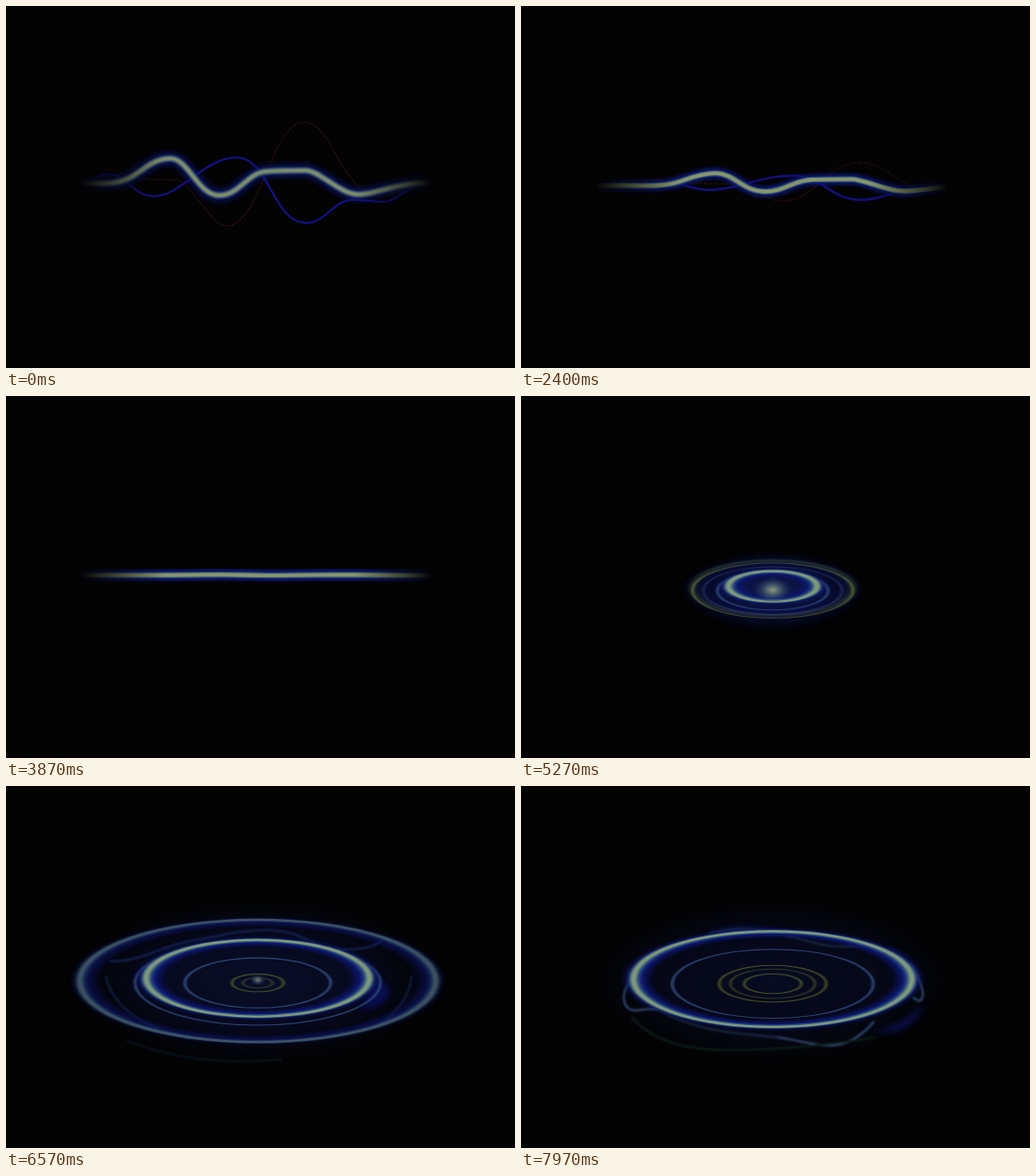
These frames come from a looping animation (552x392 px, 8 s). An HTML page without scripts:

```html
<!DOCTYPE html>
<html lang="en">
<head>
<meta charset="utf-8">
<title>Wave to ripples</title>
<style>
html, body { margin: 0; height: 100%; overflow: hidden; background: #030304; }
svg { display: block; width: 552px; height: 392px; }
path { fill: none; vector-effect: non-scaling-stroke; }
circle { fill: none; }
svg * { animation-duration: 8s; animation-iteration-count: infinite; animation-timing-function: linear; }

/* Wave */
.line { transform-origin: 273px 193px; animation-name: gather; }
.wave, .echo { transform-origin: 0 192px; }
.wave { animation-name: settle; }
.echo { animation-name: settle-echo; }
.halo { stroke: #0d1670; stroke-width: 13; filter: blur(3px); opacity: .8; }
.edge { stroke: #30568a; stroke-width: 6.5; filter: blur(1.2px); opacity: .85; }
.core { stroke: #88966a; stroke-width: 4.2; filter: blur(.8px); }

@keyframes settle {
  0% { transform: none; }
  30% { transform: translate(33px, 2.5px) scaleY(.5); }
  48% { transform: translate(54px, 2px) scaleY(.02); }
  100% { transform: translate(54px, 2px) scaleY(.02); }
}
@keyframes settle-echo {
  0% { transform: none; }
  30% { transform: translate(44px, 2px) scaleY(.37); }
  48% { transform: translate(66px, 2px) scaleY(.02); }
  100% { transform: translate(66px, 2px) scaleY(.02); }
}
@keyframes gather {
  0%, 50% { transform: none; opacity: 1; animation-timing-function: ease-in-out; }
  58% { transform: translateY(16px) scaleX(.06); opacity: 1; }
  61%, 100% { transform: translateY(18px) scaleX(.02); opacity: 0; }
}

/* Ripples: radius = base + shared travel + offset, tilted so the sides look thicker */
@property --t { syntax: "<number>"; inherits: true; initial-value: -100; }
.rings { animation-name: travel; }
.rings circle {
  --r: calc(var(--b) + var(--t) + var(--o, 0));
  r: calc(max(0, var(--r)) * 1px);
  transform: translate(273px, calc((var(--y, 212) + .03 * var(--t)) * 1px)) scale(1, .343);
  opacity: clamp(0, min(var(--r) / 14, (210 - var(--r)) / 45), 1);
}
.rings .halo { stroke-width: 22; filter: blur(5px); }
.rings .edge { stroke: #2a5080; stroke-width: 12; filter: blur(2px); }
.rings .core { stroke: #829a7c; stroke-width: 6.5; filter: blur(1.4px); }
.thin { stroke-width: 3; filter: blur(.8px); }
.blue { stroke: #2f4a7c; }
.olive { stroke: #444e26; }
.violet { stroke: #262850; }
.fast { animation-name: travel-fast, show-fast; }
.first { animation-name: travel-first, show-first; }
.mid { animation-name: show-mid; }

@keyframes travel {
  0%, 56% { --t: -100; }
  65.875% { --t: -32; }
  74.125% { --t: 0; }
  82.125% { --t: 41; animation-timing-function: cubic-bezier(.3, .5, .7, .95); }
  99.625%, 100% { --t: 71; }
}
@keyframes travel-fast {
  0%, 57% { --t: -135; }
  65.875% { --t: -43; }
  74.125% { --t: 0; }
  82.125%, 100% { --t: 41; }
}
@keyframes show-fast {
  0%, 74.125% { opacity: 1; }
  82.125%, 100% { opacity: 0; }
}
@keyframes travel-first {
  0%, 57% { --t: -165; }
  65.875% { --t: -70; }
  74.125% { --t: 0; }
  82.125% { --t: 36; }
  100% { --t: 75; }
}
@keyframes show-first {
  0%, 65% { opacity: .1; }
  72%, 100% { opacity: 1; }
}
@keyframes show-mid {
  0%, 84% { opacity: 1; }
  92%, 100% { opacity: 0; }
}

/* Centre light and soft haze */
.spark { animation-name: spark; transform-origin: 273px 210px; }
.haze { animation-name: haze; transform-origin: 273px 211px; }
@keyframes spark {
  0%, 55% { opacity: 0; transform: scale(.5); }
  60% { opacity: .9; transform: none; }
  74.125% { opacity: 1; transform: none; }
  82.125% { opacity: .8; transform: scale(.42); }
  89%, 100% { opacity: 0; transform: scale(.2); }
}
@keyframes haze {
  0%, 55% { opacity: 0; transform: scale(.1); }
  65.875% { opacity: 1; transform: scale(.5); }
  74.125% { opacity: .95; transform: scale(.95); }
  82.125% { opacity: .5; transform: none; }
  100% { opacity: .4; transform: none; }
}

/* Wavy rim */
.rim { transform-origin: 273px 211px; stroke-width: 2; filter: blur(.8px); }
.rim .blob { fill: #0c1260; stroke: none; filter: blur(3px); opacity: .8; }
.rim1 { animation-name: rim1; }
.rim2 { animation-name: rim2; }
.rim3 { animation-name: rim3; }
@keyframes rim1 {
  0%, 67% { opacity: 0; transform: scale(.85); }
  74.125% { opacity: 1; transform: none; }
  80%, 100% { opacity: 0; transform: scale(1.05); }
}
@keyframes rim2 {
  0%, 75% { opacity: 0; transform: scale(.94); }
  82.125% { opacity: 1; transform: none; }
  91%, 100% { opacity: 0; transform: scale(1.04); }
}
@keyframes rim3 {
  0%, 84% { opacity: 0; transform: scale(.92); }
  95% { opacity: .9; }
  99.625%, 100% { opacity: 1; transform: none; }
}
</style>
</head>
<body>
<svg viewBox="0 0 552 392">
  <defs>
    <linearGradient id="fade" gradientUnits="userSpaceOnUse" x1="80" x2="462" y1="0" y2="0">
      <stop offset="0" stop-color="#000"/>
      <stop offset=".09" stop-color="#666"/>
      <stop offset=".24" stop-color="#fff"/>
      <stop offset=".78" stop-color="#fff"/>
      <stop offset=".93" stop-color="#666"/>
      <stop offset="1" stop-color="#000"/>
    </linearGradient>
    <mask id="ends" maskUnits="userSpaceOnUse" x="0" y="0" width="552" height="392">
      <rect width="552" height="392" fill="url(#fade)"/>
    </mask>
    <radialGradient id="glow">
      <stop offset="0" stop-color="#9aa078"/>
      <stop offset=".3" stop-color="#647c78" stop-opacity=".8"/>
      <stop offset="1" stop-color="#1a2a60" stop-opacity="0"/>
    </radialGradient>
    <radialGradient id="mist">
      <stop offset="0" stop-color="#101a50"/>
      <stop offset=".55" stop-color="#0b1240" stop-opacity=".85"/>
      <stop offset=".8" stop-color="#070c24" stop-opacity=".6"/>
      <stop offset="1" stop-color="#04060c" stop-opacity="0"/>
    </radialGradient>
    <path id="wave" d="M-80 192H88C112 192 118 193 132 187S158 165 178 165S208 205 231 205S262 179 284 179C300 178 310 178 325 178S362 204 382 204S425 191 460 191H600"/>
  </defs>

  <g class="line">
    <g mask="url(#ends)">
      <g class="echo" stroke-width="1.6">
        <path stroke="#2c130b" stroke-dasharray="2 1.5" d="M-80 192H50C75 192 85 177 105 177S135 188 165 188S190 188 205 206S228 238 240 238C275 238 288 126 323 126C352 126 360 186 390 200S430 192 455 191H600"/>
        <path stroke="#16128c" stroke-width="2.2" d="M-80 192H88C100 183 112 178 124 186S145 206 160 206C190 206 215 164 250 164S290 235 325 235C347 235 355 210 375 210S396 212 410 212S435 194 455 191H600"/>
      </g>
      <g class="wave">
        <use href="#wave" class="halo"/>
        <use href="#wave" class="edge"/>
        <use href="#wave" class="core"/>
      </g>
    </g>
  </g>

  <ellipse class="haze" cx="273" cy="211" rx="205" ry="92" fill="url(#mist)"/>

  <g class="rim rim1">
    <path class="blob" d="M378 268Q425 255 438 232Q444 252 415 264Z"/>
    <path class="blob" d="M102 200Q112 178 150 172L122 196Z"/>
    <path stroke="#1a2a54" d="M104 240C125 268 170 280 215 283S300 286 340 280S415 262 440 238"/>
    <path stroke="#10252c" d="M100 225C115 262 175 288 275 289S420 275 445 225M105 195Q135 165 200 154M345 154Q425 168 443 195"/>
  </g>
  <g class="rim rim2">
    <path class="blob" d="M400 210Q420 212 414 230Q405 240 385 242Z"/>
    <path stroke="#18285c" d="M112 190C150 190 165 174 200 168S250 156 285 156S335 177 365 177S400 172 408 168"/>
    <path stroke="#14244a" d="M108 205C115 240 150 262 200 273M440 205Q438 235 405 258"/>
    <path stroke="#0a1620" d="M130 275Q200 305 300 296"/>
  </g>
  <g class="rim rim3">
    <path class="blob" d="M378 268Q425 255 436 234Q432 258 405 266Z"/>
    <path class="blob" d="M203 159Q240 148 282 158Q240 160 203 164Z"/>
    <path class="blob" d="M395 172Q425 185 434 212L424 205Z"/>
    <path stroke="#34507c" d="M118 212C106 228 112 244 125 243S140 240 150 242M278 272C300 275 315 281 335 281S370 270 383 255M424 195C432 208 438 224 435 230S428 230 425 229"/>
    <path stroke="#1c2c48" d="M150 242C180 262 225 268 278 272M205 160C235 150 270 156 300 165S345 176 380 172"/>
    <path stroke="#0c2018" d="M120 250Q150 287 230 286T385 272"/>
  </g>

  <g class="rings">
    <g class="fast">
      <circle class="thin olive" style="--b:130"/>
      <circle class="thin violet" style="--b:118"/>
    </g>
    <circle class="thin blue" style="--b:38"/>
    <circle class="thin olive" style="--b:-13"/>
    <circle class="thin olive" style="--b:-25" stroke-opacity=".7"/>
    <circle class="thin olive" style="--b:-40"/>
    <g class="mid"><circle class="thin blue" style="--b:92"/></g>

    <g class="first" style="--b:157;--y:210">
      <circle class="halo" style="--o:-6"/>
      <circle class="edge" style="--o:-1"/>
      <circle class="core"/>
    </g>
    <g style="--b:80;--y:207">
      <circle class="halo" style="--o:-4"/>
      <circle class="edge" style="--o:-1"/>
      <circle class="core"/>
    </g>
  </g>

  <ellipse class="spark" cx="273" cy="210" rx="22" ry="15" fill="url(#glow)"/>
</svg>
</body>
</html>
```
